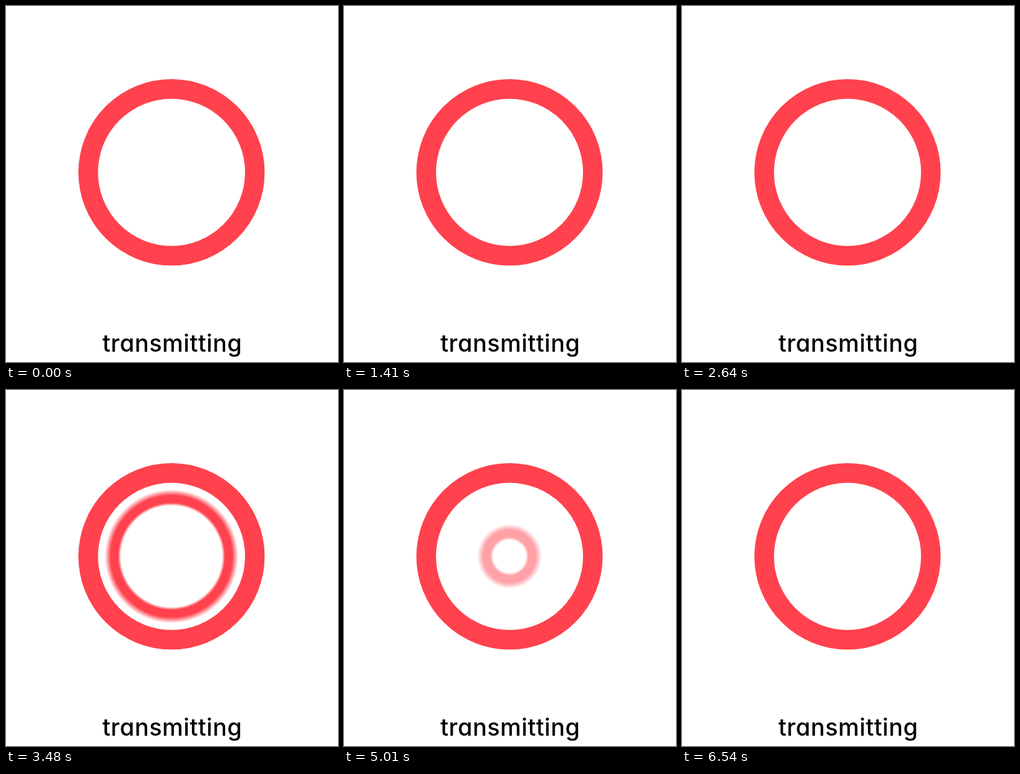
An HTML page with a canvas that plays this animation: 550 by 589 pixels, repeating every 6570 ms.

```html
<!DOCTYPE html>
<html lang="en">
<head>
<meta charset="utf-8">
<title>transmitting</title>
<style>
  html, body { margin: 0; width: 100%; height: 100%; overflow: hidden; background: #fff; }
  canvas, svg { position: absolute; left: 0; top: 0; }
  text { font: 500 39px Inter, Lato, sans-serif; letter-spacing: .6px; font-feature-settings: "cv11"; }
</style>
</head>
<body>
<canvas width="550" height="589"></canvas>
<svg width="550" height="589"><text x="275.5" y="572" text-anchor="middle">transmitting</text></svg>
<script>
const LOOP = 6570, CYCLE = LOOP / 2, SECOND_BEAT = 1340;
const CX = 274.2, CY = 275.2;
const ctx = document.querySelector('canvas').getContext('2d');
const clamp = v => Math.min(1, Math.max(0, v));
const smooth = (t, from, to) => {
  const u = clamp((t - from) / (to - from));
  return u * u * (3 - 2 * u);
};
const tint = a => `rgba(255,66,77,${a})`;

// Soft-edged band around radius c
function band(c, alpha) {
  if (alpha <= 0) return;
  const outer = c + 16;
  const g = ctx.createRadialGradient(CX, CY, 0, CX, CY, outer);
  for (const [d, a] of [[-11, 0], [-6, 1], [6, 1], [16, 0]])
    g.addColorStop(clamp((c + d) / outer), tint(a * alpha));
  ctx.fillStyle = g;
  ctx.beginPath();
  ctx.arc(CX, CY, outer, 0, 7);
  ctx.fill();
}

function ring(swell) {
  const outer = 154.3 + 12.9 * swell, inner = 121.8 + 7.8 * swell;
  ctx.strokeStyle = tint(1);
  ctx.lineWidth = outer - inner;
  ctx.beginPath();
  ctx.arc(CX, CY, (outer + inner) / 2, 0, 7);
  ctx.stroke();
}

function draw(time) {
  const p = time % CYCLE;
  const t = p < SECOND_BEAT ? p : p - SECOND_BEAT;
  ctx.clearRect(0, 0, 550, 589);

  // Ripple sinks to the centre, then a wave leaves the ring
  const sink = 95 - .3 * (t - 195);
  if (t > 52 && sink > 0) band(sink, clamp(sink / 76));
  if (t > 648 && t < 820) band(145 + .75 * (t - 660), (820 - t) / 172);

  ring(smooth(t, 645, 775) - smooth(t, 1010, 1200));
}

const start = performance.now();
function frame() {
  draw((performance.now() - start) % LOOP);
  requestAnimationFrame(frame);
}
frame();
</script>
</body>
</html>
```
